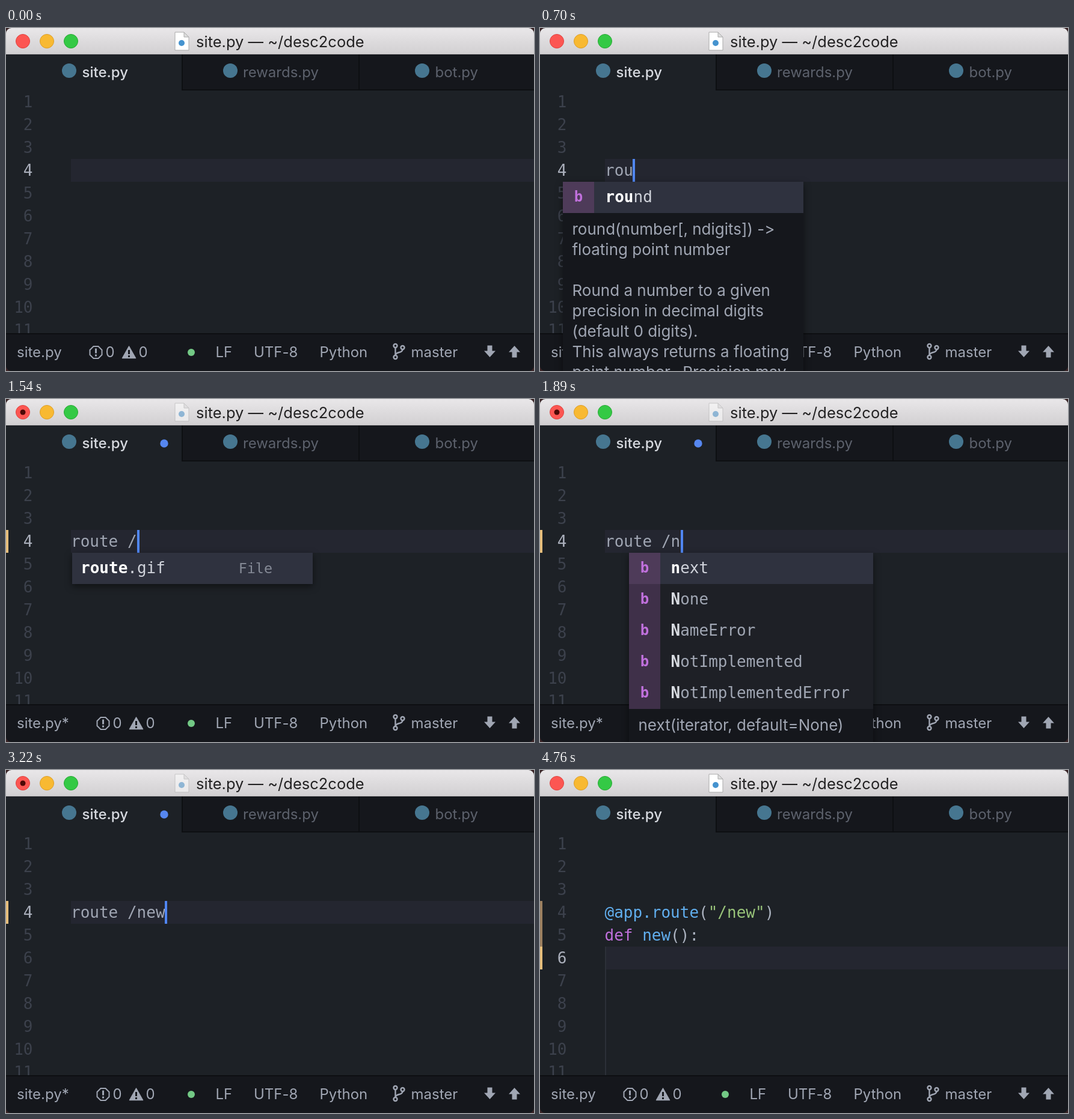
Animation of 878x571 px, one loop 4830 ms. Source, as an HTML page:

```html
<!DOCTYPE html>
<html lang="en">
<head>
<meta charset="utf-8">
<title>Code editor</title>
<style>
  html, body { margin: 0; width: 100%; height: 100%; overflow: hidden; background: #3a2426; }
  svg { display: block; width: 100vw; height: 100vh; }
  text { white-space: pre; }
  .ui { font-family: Inter, Roboto, sans-serif; font-feature-settings: "calt" 0; }
  .mono { font-family: "DejaVu Sans Mono", "Liberation Mono", monospace; }
  .popup { filter: drop-shadow(0 4px 6px rgba(0, 0, 0, .5)); }
</style>
</head>
<body>
<svg id="stage" viewBox="0 0 878 571" preserveAspectRatio="none" xmlns="http://www.w3.org/2000/svg">
  <defs>
    <linearGradient id="bar" x1="0" y1="0" x2="0" y2="1">
      <stop offset="0" stop-color="#e9e7e9"/>
      <stop offset="1" stop-color="#d1cfd1"/>
    </linearGradient>
    <clipPath id="frame"><rect width="878" height="571" rx="9"/></clipPath>
  </defs>
  <g clip-path="url(#frame)">
    <rect width="878" height="571" fill="#1d2126"/>
    <g id="editor"></g>
    <g id="chrome"></g>
    <g id="popup"></g>
  </g>
</svg>
<script>
const LOOP = 4830;
const CHAR = 15.65, LEFT = 108, TOP = 104, LINE = 38, ROW = 52;
const GREY = "#a0a6b3", BLUE = "#61afef", PURPLE = "#c070dc", GREEN = "#98c379";
const PANEL = "#15171c", EDGE = "#0d0f12", LIST = "#1e2026";

// Typed text by start time
const TYPING = [[0, ""], [420, "r"], [560, "ro"], [630, "rou"], [840, "rout"], [910, "route"],
  [1330, "route "], [1470, "route /"], [1890, "route /n"], [1960, "route /ne"], [2100, "route /new"]];
const EXPAND = 3360, MODIFIED = 1260, SAVED = 4410;
const CURSOR_OFF = [[0, 210], [2520, 2940], [3850, 4270], [4690, LOOP]];

const POPUPS = [
  { from: 560, to: 840, build: t => roundPopup(t < 630 ? 2 : 3) },
  { from: 980, to: 1330, build: () => filePopup(94) },
  { from: 1330, to: 1890, build: () => filePopup(110) },
  { from: 1890, to: 2100, build: t => builtinPopup(t < 1960 ? 1 : 2) },
  { from: 2100, to: 3150, build: () => dirPopup() }
];

const $ = id => document.getElementById(id);
const esc = s => s.replace(/&/g, "&amp;").replace(/</g, "&lt;").replace(/>/g, "&gt;");
const rect = (x, y, w, h, fill, more = "") =>
  `<rect x="${x}" y="${y}" width="${w}" height="${h}" fill="${fill}" ${more}/>`;
const dot = (x, y, r, fill, more = "") => `<circle cx="${x}" cy="${y}" r="${r}" fill="${fill}" ${more}/>`;
const ui = (x, y, s, fill, size = 24, more = "") =>
  `<text class="ui" x="${x}" y="${y}" font-size="${size}" fill="${fill}" ${more}>${esc(s)}</text>`;
const mono = (x, y, body, fill, more = "") =>
  `<text class="mono" x="${x}" y="${y}" font-size="26" fill="${fill}" ${more}>${body}</text>`;
const span = (s, fill, bold) =>
  `<tspan fill="${fill}"${bold ? ' font-weight="700"' : ""}>${esc(s)}</tspan>`;
const lineTop = n => TOP + LINE * (n - 1);

// Marks characters at the given indices as matched
function matched(word, hits, active) {
  return [...word].map((c, i) => hits.includes(i)
    ? span(c, active ? "#ffffff" : "#d7dae0", true)
    : span(c, active ? "#d0d3db" : GREY)).join("");
}

function popupBox(x, w, h, body) {
  return `<g class="popup">${rect(x, 256, w, h, LIST, 'rx="3"')}</g>` +
    rect(x, 256, w, ROW, "#2f323f") + body;
}

function popupRow(x, i, word, hits) {
  return mono(x, 290 + i * ROW, matched(word, hits, i === 0), GREY);
}

function badge(x, i) {
  const y = 256 + i * ROW;
  return rect(x, y, ROW, ROW, i ? "#3f3049" : "#4e3b59") +
    mono(x + 26, y + 33, "b", PURPLE, 'font-weight="700" text-anchor="middle" style="font-size:24px"');
}

function kind(x, i, label) {
  return mono(x, 290 + i * ROW, label, i ? "#5b5f69" : "#858a96", 'text-anchor="end" style="font-size:23.4px"');
}

function roundPopup(n) {
  const doc = ["round(number[, ndigits]) ->", "floating point number", "", "Round a number to a given",
    "precision in decimal digits", "(default 0 digits).", "This always returns a floating", "point number.  Precision may"];
  const body = rect(38, 308, 400, 263, PANEL) + badge(38, 0) +
    popupRow(108.5, 0, "round", [0, 1, 2].slice(0, n)) +
    doc.map((s, i) => ui(53.5, 344 + 34 * i, s, GREY, 26)).join("");
  return popupBox(38, 400, 330, body);
}

function filePopup(x) {
  return popupBox(x, 400, ROW,
    popupRow(x + 14, 0, "route.gif", [0, 1, 2, 3, 4]) + kind(x + 333, 0, "File"));
}

function builtinPopup(n) {
  const words = ["next", "None", "NameError", "NotImplemented", "NotImplementedError"];
  const rows = words.map((w, i) =>
    badge(148, i) + popupRow(217.5, i, w, n > 1 ? [0, w.indexOf("e")] : [0])).join("");
  return popupBox(148, 406, 330, rows + rect(148, 516, 406, 55, PANEL) +
    ui(163.5, 552, "next(iterator, default=None)", GREY, 26));
}

function dirPopup() {
  return popupBox(204, 422, 2 * ROW,
    popupRow(217.5, 0, "Network", [0, 1, 3]) + kind(605, 0, "Dir") +
    popupRow(217.5, 1, ".PKInstallSandboxM…", [4]) + kind(605, 1, "Dir"));
}

function editor(s) {
  const active = s.expanded ? 6 : 4;
  let out = rect(LEFT, lineTop(active), 770, LINE, "#242630");
  if (s.expanded) {
    out += rect(108, lineTop(6), 2, 214, "#2c3038") +
      rect(0, lineTop(4), 4, 2 * LINE, "#9c8060") + rect(0, lineTop(6), 4, LINE, "#e6be7c");
  } else if (s.barred) {
    out += rect(0, lineTop(4), 4, LINE, "#e6be7c");
  }
  for (let n = 1; n <= 11; n++) {
    out += mono(44.5, lineTop(n) + 28, n, n === active ? "#abb0bc" : "#3c414c", 'text-anchor="end"');
  }
  if (s.expanded) {
    out += mono(107.5, 246, span("@app.route", BLUE) + span("(", "#abb2bf") +
      span('"/new"', GREEN) + span(")", "#abb2bf"), GREY);
    out += mono(107.5, 284, span("def ", PURPLE) + span("new", BLUE) + span("():", "#abb2bf"), GREY);
  } else {
    out += mono(LEFT, 246, esc(s.text), GREY);
  }
  if (s.cursor) {
    // The cursor sits on a two-pixel grid
    const col = s.expanded ? 4 : s.text.length;
    out += rect(2 * Math.round((LEFT + col * CHAR) / 2), lineTop(active), 4, LINE, "#5086f2");
  }
  return out;
}

function titleBar(dirty) {
  const light = (x, fill, edge) => dot(x, 22, 11.5, fill, `stroke="${edge}"`);
  return rect(0, 0, 878, 44, "url(#bar)") + rect(0, 43, 878, 1, "#b5b3b5") +
    light(28, "#fc5652", "#df4340") + light(68, "#f8b932", "#dc9e29") + light(108, "#34c945", "#29a836") +
    (dirty ? dot(28, 22, 4.5, "#4d0906") : "") +
    `<g opacity="${dirty ? .5 : 1}"><path d="M281 7H296L304 15V37H281Z" fill="#fff" stroke="#aaa"/>
      <path d="M296 7V15H304Z" fill="#ddd" stroke="#aaa"/>${dot(292, 25, 5, "#4593cf")}</g>` +
    ui(316, 32, "site.py — ~/desc2code", "#222122", 25.5);
}

function tabs(dirty) {
  return rect(292, 44, 586, 60, PANEL) + rect(292, 102, 586, 2, EDGE) +
    rect(292, 44, 2, 60, EDGE) + rect(586, 44, 2, 60, EDGE) +
    [105, 373, 692].map(x => dot(x, 71, 12, "#467690")).join("") +
    ui(126.5, 82, "site.py", "#d7dae0", 24, 'font-weight="500"') +
    ui(394, 82, "rewards.py", "#5d626d") + ui(713.5, 82, "bot.py", "#5d626d") +
    (dirty ? dot(263, 74, 6.7, "#5687f0") : "");
}

function statusBar(dirty) {
  const arrow = (x, flip) => `<path transform="translate(${x} 538.5) scale(1 ${flip})"
    d="M-4 -10H4V-1H9.5L0 9.5L-9.5 -1H-4Z" fill="${GREY}"/>`;
  const counts = `<g transform="translate(${dirty ? 12 : 0} 0)">
    <path d="M145.5 530H153.5L159.5 536V544L153.5 550H145.5L139.5 544V536Z" fill="none" stroke="${GREY}" stroke-width="2"/>
    ${rect(148, 533.5, 3, 8, GREY)}${rect(148, 543.5, 3, 3, GREY)}
    <path d="M204.5 530L215.5 549.5H193.5Z" fill="${GREY}" stroke="${GREY}" stroke-width="1.5" stroke-linejoin="round"/>
    ${rect(203, 536, 3, 7, PANEL)}${rect(203, 545, 3, 3, PANEL)}
    ${ui(165.5, 548, "0", GREY)}${ui(220.5, 548, "0", GREY)}</g>`;
  const branch = `<g fill="none" stroke="${GREY}" stroke-width="2.4">
    <circle cx="647.5" cy="529" r="3"/><circle cx="659.5" cy="532" r="3"/><circle cx="647.5" cy="548" r="3"/>
    <path d="M647.5 532V545M659.5 535C659.5 542 648 538 647.5 545"/></g>`;
  return rect(0, 508, 878, 63, PANEL) + rect(0, 508, 878, 2, EDGE) +
    ui(18, 548, dirty ? "site.py*" : "site.py", GREY) + counts + dot(308, 540, 6, "#73c985") +
    ui(348.5, 548, "LF", GREY) + ui(412, 548, "UTF-8", GREY) + ui(521.5, 548, "Python", GREY) +
    branch + ui(673.5, 548, "master", GREY) + arrow(804.5, 1) + arrow(845.5, -1);
}

function stateAt(t) {
  const popup = POPUPS.find(p => t >= p.from && t < p.to);
  return {
    text: TYPING.filter(([at]) => at <= t).pop()[1],
    expanded: t >= EXPAND,
    barred: t >= MODIFIED,
    dirty: t >= MODIFIED && t < SAVED,
    cursor: !CURSOR_OFF.some(([a, b]) => t >= a && t < b),
    popup: popup ? popup.build(t) : ""
  };
}

let last = "";
function draw() {
  const s = stateAt(performance.now() % LOOP);
  const key = JSON.stringify(s);
  if (key !== last) {
    last = key;
    $("editor").innerHTML = editor(s);
    $("chrome").innerHTML = titleBar(s.dirty) + tabs(s.dirty) + statusBar(s.dirty);
    $("popup").innerHTML = s.popup;
  }
  requestAnimationFrame(draw);
}
draw();
</script>
</body>
</html>
```
